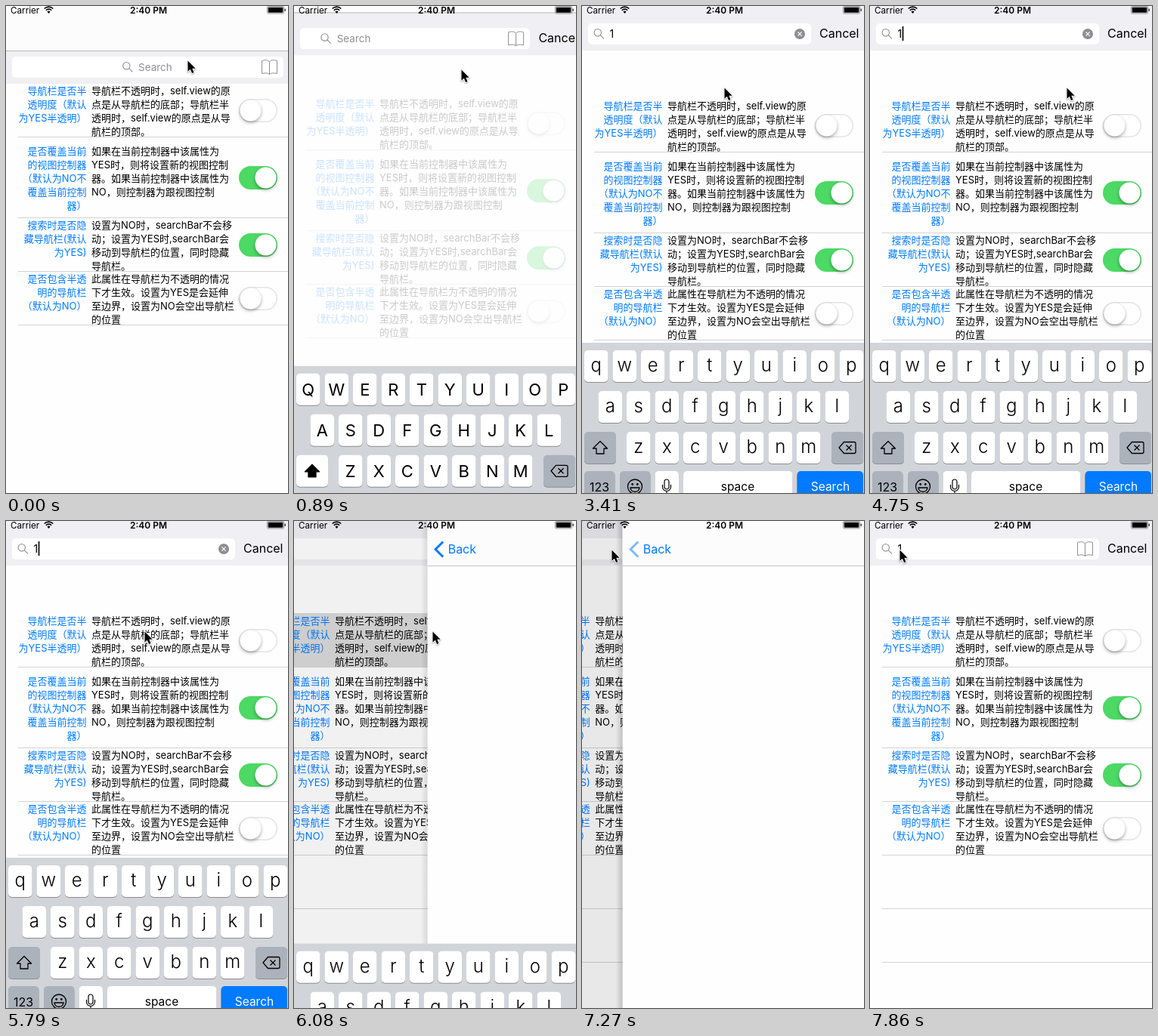
Write an HTML page with a canvas that moves like this. It is 373x645 px and loops after 8000 ms.

```html
<!DOCTYPE html>
<html lang="zh-Hans">
<head>
<meta charset="utf-8">
<style>
html, body { margin: 0; width: 100%; height: 100%; overflow: hidden; background: #fff; }
canvas { display: block; width: 373px; height: 645px; }
</style>
</head>
<body>
<canvas id="stage"></canvas>
<script>
const W = 373, H = 645, LOOP = 8000;
const SEARCH_AT = 700, TYPE_AT = 1930, TAP_AT = 5930, PUSH_AT = 5983, POP_AT = 7234;
const BLUE = '#007aff', GRAY = '#8e8e93', BAR = '#efeff4', LINE = '#d3d3d6';
const FONT = 'Inter, "Noto Sans CJK SC", "Noto Sans CJK JP", "Noto Sans CJK", sans-serif';

const canvas = document.getElementById('stage');
const ctx = canvas.getContext('2d');
const dpr = window.devicePixelRatio || 1;
canvas.width = W * dpr;
canvas.height = H * dpr;

const rows = [
  { top: 0, height: 71, pad: 9, on: false,
    label: ['导航栏是否半', '透明度（默认', '为YES半透明）'],
    text: ['导航栏不透明时，self.view的原', '点是从导航栏的底部；导航栏半', '透明时，self.view的原点是从导', '航栏的顶部。'] },
  { top: 71, height: 107, pad: 18, on: true,
    label: ['是否覆盖当前', '的视图控制器', '（默认为NO不', '覆盖当前控制', '器）'],
    text: ['如果在当前控制器中该属性为', 'YES时，则将设置新的视图控制', '器。如果当前控制器中该属性为', 'NO，则控制器为跟视图控制'] },
  { top: 178, height: 71, pad: 9, on: true,
    label: ['搜索时是否隐', '藏导航栏(默认', '为YES)'],
    text: ['设置为NO时，searchBar不会移', '动；设置为YES时,searchBar会', '移动到导航栏的位置，同时隐藏', '导航栏。'] },
  { top: 249, height: 71, pad: 9, on: false,
    label: ['是否包含半透', '明的导航栏', '（默认为NO）'],
    text: ['此属性在导航栏为不透明的情况', '下才生效。设置为YES是会延伸', '至边界，设置为NO会空出导航栏', '的位置'] }
];

// Pointer waypoints: time, x, y
const pointerPath = [
  [0, 240, 72], [300, 240, 72], [450, 221, 84], [1930, 221, 84], [2520, 188, 108],
  [3410, 188, 108], [3750, 284, 127], [4000, 258, 114], [4600, 260, 108],
  [5040, 260, 108], [5750, 183, 146], [6150, 183, 146], [7000, 39, 38], [LOOP, 39, 38]
];

const mix = (a, b, p) => a + (b - a) * p;

// Critically damped spring from 0 to 1
function spring(ms) {
  const x = Math.max(0, ms) * 0.018;
  return 1 - (1 + x) * Math.exp(-x);
}

function at(x, y, draw) {
  ctx.save();
  ctx.translate(x, y);
  draw();
  ctx.restore();
}

function rect(x, y, w, h, color) {
  ctx.fillStyle = color;
  ctx.fillRect(x, y, w, h);
}

function round(x, y, w, h, r, color) {
  ctx.fillStyle = color;
  ctx.beginPath();
  ctx.roundRect(x, y, w, h, r);
  ctx.fill();
}

function circle(x, y, r, color) {
  round(x - r, y - r, 2 * r, 2 * r, r, color);
}

function stroke(d, color, width = 1) {
  ctx.strokeStyle = color;
  ctx.lineWidth = width;
  ctx.stroke(new Path2D(d));
}

function fill(d, color) {
  ctx.fillStyle = color;
  ctx.fill(new Path2D(d));
}

function text(str, x, y, size, color = '#000', align = 'left', weight = 400) {
  ctx.font = `${weight} ${size}px ${FONT}`;
  ctx.textAlign = align;
  ctx.fillStyle = color;
  ctx.fillText(str, x, y);
}

function toggle(y, on) {
  round(308, y - 15.5, 51, 31, 15.5, on ? '#4cd964' : '#e3e3e3');
  if (!on) round(309.5, y - 14, 48, 28, 14, '#fff');
  ctx.save();
  ctx.shadowColor = 'rgba(0,0,0,.35)';
  ctx.shadowBlur = 4 * dpr;
  ctx.shadowOffsetY = 2 * dpr;
  circle(on ? 343.5 : 323.5, y, 14, '#fff');
  ctx.restore();
}

function list(y, highlighted, emptyRows) {
  if (highlighted) rect(0, y - 1, W, 72, '#d9d9d9');
  for (const row of rows) {
    const first = y + row.top + row.pad + 5;
    row.label.forEach((s, i) => text(s, 106.5, first + i * 18, 13, BLUE, 'right'));
    row.text.forEach((s, i) => text(s, 113, first + i * 18, 13));
    toggle(y + row.top + row.height / 2, row.on);
    rect(16, y + row.top + row.height - 1, W, 1, LINE);
  }
  if (emptyRows) for (let i = 1; i < 4; i++) rect(16, y + 319 + i * 71, W, 1, LINE);
}

function searchBar(t, p, editing) {
  const typed = t >= TYPE_AT;
  const navBottom = 59 * (1 - p), y = 59 - 44 * p;
  rect(0, 0, W, navBottom, '#fcfcfd');
  rect(0, navBottom, W, y + 44 - navBottom, BAR);
  if (p < 0.98) rect(0, navBottom, W, 1, '#b9b9bd');
  const right = mix(367, 303, p);
  round(8, y + 8, right - 8, 28, 5, '#fff');
  at(mix(154, 15.5, p), y + 15, () =>
    stroke('M10 5.2A4.7 4.7 0 1 1 .6 5.2A4.7 4.7 0 1 1 10 5.2M8.7 8.6L13.5 13.4', GRAY, 1.1));
  if (typed) text('1', 36.5, y + 27, 14);
  else text('Search', mix(175, 37, p), y + 27, 13.5, GRAY);

  if (typed && editing) {
    circle(288, y + 22, 7, GRAY);
    at(288, y + 22, () => stroke('M-2.6-2.6L2.6 2.6M2.6-2.6L-2.6 2.6', '#fff', 1.2));
  } else {
    at(right - 29, y + 12, () => stroke(
      'M.5 1.5C4 .2 9 .2 10.5 3C12 .2 17 .2 20.5 1.5V18.5C17 17.5 12 17.5 10.5 19.5C9 17.5 4 17.5 .5 18.5ZM10.5 3V19.5', GRAY));
  }
  const caretOn = typed ? (t - 2500 + 10200) % 1020 < 510 : t > 900 && t < 1490;
  if (editing && caretOn) rect(typed ? 42.5 : 36, y + 12, 2, 19, '#222');
  text('Cancel', mix(380, 314, p), y + 27, 16);
}

function key(x, y, w, color = '#fff') {
  round(x, y + 1, w, 42, 5, '#8b8d91');
  round(x, y, w, 42, 5, color);
}

function letters(str, x, y, upper) {
  [...str].forEach((c, i) => {
    const left = x + i * 37.5;
    key(left, y, 31.5);
    text(upper ? c.toUpperCase() : c, left + 15.75, y + (upper ? 29 : 28), upper ? 22 : 24,
      '#000', 'center', upper ? 400 : 300);
  });
}

function keyboard(y, upper) {
  const dark = '#acb2bc';
  at(0, y, () => {
    rect(0, 0, W, 220, '#d1d5da');
    letters('qwertyuiop', 3, 10, upper);
    letters('asdfghjkl', 21.5, 64, upper);
    letters('zxcvbnm', 59, 118, upper);
    key(3, 118, 42, upper ? '#fff' : dark);
    at(24, 139, () => {
      const arrow = 'M0-8.5L9.5 1H5V8H-5V1H-9.5Z';
      if (upper) fill(arrow, '#000');
      ctx.lineJoin = 'round';
      stroke(arrow, '#000', 1.3);
    });
    key(330, 118, 42, dark);
    at(351, 139, () => stroke(
      'M-11 0L-4.5-7.5H9Q11-7.5 11-5.5V5.5Q11 7.5 9 7.5H-4.5ZM-1.5-3.5L5.5 3.5M5.5-3.5L-1.5 3.5', '#000', 1.3));
    key(3, 170, 40.5, dark);
    text('123', 23, 197, 16, '#000', 'center');
    key(50, 170, 40.5, dark);
    at(70, 190.5, () => {
      stroke('M9.5 0A9.5 9.5 0 1 1-9.5 0A9.5 9.5 0 1 1 9.5 0M-6 1.5H6A6 5.5 0 0 1-6 1.5Z', '#000', 1.3);
      circle(-3.3, -3, 1.4, '#000');
      circle(3.3, -3, 1.4, '#000');
    });
    key(96.5, 170, 31.5);
    at(112, 190, () => stroke(
      'M-3-6A3 3 0 0 1 3-6V1A3 3 0 0 1-3 1ZM-5.5-2V1A5.5 5.5 0 0 0 5.5 1V-2M0 6.5V9.5M-3.5 9.5H3.5', '#000', 1.2));
    key(134, 170, 144.5);
    text('space', 206, 196, 15.5, '#000', 'center');
    key(284.5, 170, 87.5, upper ? dark : BLUE);
    text('Search', 328.5, 196, 15.5, upper ? '#7c828b' : '#fff', 'center');
  });
}

function detailPage(x, chevronAlpha, shade) {
  const shadow = ctx.createLinearGradient(x - 9, 0, x, 0);
  shadow.addColorStop(0, 'rgba(0,0,0,0)');
  shadow.addColorStop(1, `rgba(0,0,0,${0.2 * shade})`);
  rect(x - 9, 0, 9, H, shadow);
  at(x, 0, () => {
    rect(0, 0, W, H, '#fefefe');
    rect(0, 0, W, 59, '#fcfcfd');
    rect(0, 59, W, 1, '#c4c4c8');
    text('Back', 27, 43, 16, BLUE);
    ctx.globalAlpha = chevronAlpha;
    ctx.lineJoin = 'miter';
    stroke('M20.5 27.5L10.5 37.5L20.5 47.5', BLUE, 3);
  });
}

function statusBar() {
  text('Carrier', 6, 10, 11.7);
  text('2:40 PM', 188.5, 10, 12, '#000', 'center', 600);
  at(56.5, 9.5, () => {
    fill('M0 .5L-2-2A2.8 2.8 0 0 1 2-2Z', '#000');
    stroke('M-3.7-3.8A5.2 5.2 0 0 1 3.7-3.8M-5.8-6A8.2 8.2 0 0 1 5.8-6', '#000', 1.6);
  });
  stroke('M347 .5H366Q367.5 .5 367.5 2V8.5Q367.5 10 366 10H347Q345.5 10 345.5 8.5V2Q345.5 .5 347 .5Z', '#777', 0.8);
  round(346.7, 1.7, 19.6, 7.1, 0.8, '#000');
  round(368.5, 3.5, 1.5, 3.5, 0.7, '#444');
}

function pointer(t) {
  const i = pointerPath.findIndex(p => p[0] > t);
  const [t0, x0, y0] = pointerPath[i - 1], [t1, x1, y1] = pointerPath[i];
  let p = (t - t0) / (t1 - t0);
  p = p * p * (3 - 2 * p);
  at(mix(x0, x1, p) + 0.5, mix(y0, y1, p) + 0.5, () => {
    const arrow = 'M0 0V14.2L3.3 11.2L5.6 16.5L8 15.4L5.8 10.3H10.2Z';
    ctx.lineJoin = 'round';
    ctx.shadowColor = 'rgba(0,0,0,.35)';
    ctx.shadowBlur = 2 * dpr;
    ctx.shadowOffsetY = dpr;
    stroke(arrow, '#fff', 2);
    ctx.shadowColor = 'transparent';
    fill(arrow, '#000');
  });
}

function draw(t) {
  const search = spring(t - SEARCH_AT);
  const push = t < POP_AT ? spring(t - PUSH_AT) : 1 - spring(t - POP_AT);
  const typed = t >= TYPE_AT;
  ctx.setTransform(dpr, 0, 0, dpr, 0, 0);
  rect(0, 0, W, H, '#fefefe');

  at(-0.3 * W * push, 0, () => {
    list(103 + 20 * search, t >= TAP_AT && t < POP_AT, typed);
    if (!typed) rect(0, 0, W, H, `rgba(254,254,254,${0.93 * search})`);
    searchBar(t, search, t >= SEARCH_AT && t < PUSH_AT);
  });
  if (push > 0.002) {
    rect(0, 0, W, H, `rgba(0,0,0,${0.1 * push})`);
    detailPage(W * (1 - push), t < POP_AT ? 1 : Math.max(0, 1 - 3.4 * (1 - push)), push);
  }
  const keyboardY = t < PUSH_AT ? mix(662, 446, search) : mix(446, 662, spring(t - PUSH_AT));
  if (keyboardY < H) keyboard(keyboardY, !typed);
  statusBar();
  pointer(t);
}

function frame() {
  draw(performance.now() % LOOP);
  requestAnimationFrame(frame);
}
frame();
</script>
</body>
</html>
```
